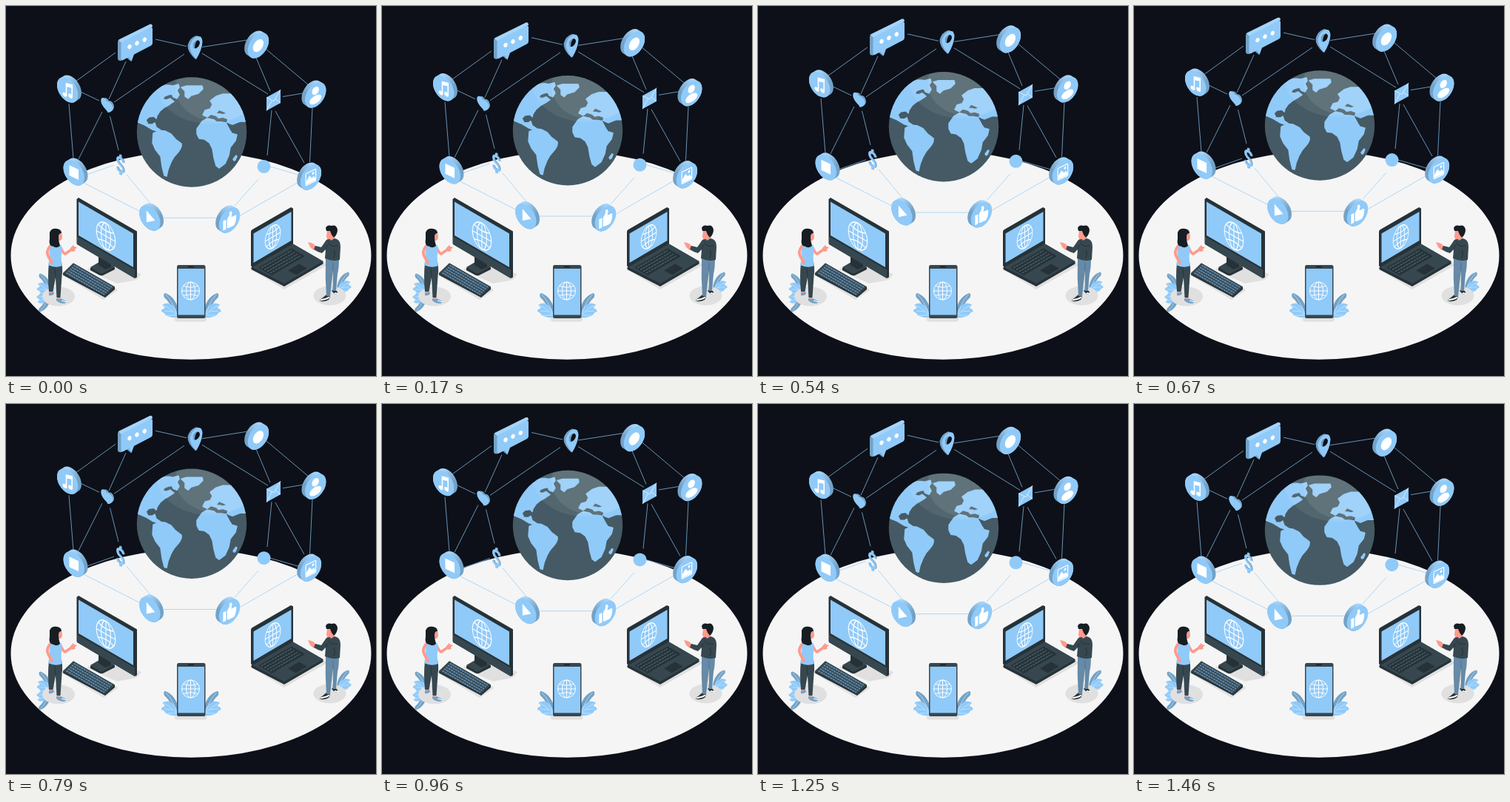
An HTML page for the animation above (1500 ms loop, 500 by 500 pixels).

```html
<!DOCTYPE html>
<html lang="en">
<head>
<meta charset="utf-8">
<title>Connected world</title>
<style>
  html, body { margin: 0; height: 100%; overflow: hidden; background: #0d1018; }
  svg { display: block; width: 100vw; height: 100vh; }
  .blue { fill: #90caf9; }
  .shade { fill: #73a2c7; }
  .white { fill: #fff; }
  .dark { fill: #263238; }
  .slate { fill: #37474f; }
  .grey { fill: #455a64; }
  .floor { fill: #e0e0e0; }
  .skin { fill: #ff9a8c; }
  .line { fill: none; stroke: #fff; stroke-width: 1.3; }
  .land { fill: #90caf9; stroke: #90caf9; stroke-width: 1.5; stroke-linejoin: round; }
</style>
</head>
<body>
<svg viewBox="0 0 500 500">
  <defs>
    <linearGradient id="rim" gradientUnits="userSpaceOnUse" x1="-12" y1="-16" x2="20" y2="8">
      <stop offset=".2" stop-color="#a6d4fa"/><stop offset=".65" stop-color="#73a2c7"/>
    </linearGradient>
    <clipPath id="ball"><circle cx="251" cy="170.5" r="74.2"/></clipPath>
    <!-- Disc in an isometric plane: a round-capped stroke makes the thickness -->
    <g id="disc">
      <path d="M0 0L5-5" stroke="url(#rim)" stroke-width="31.6" stroke-linecap="round"/>
      <circle r="15.8" class="blue"/>
    </g>
    <g id="web" class="line">
      <circle r="16"/><ellipse rx="8" ry="16"/>
      <path d="M0-16V16M-16 0H16M-13-9Q0-4 13-9M-13 9Q0 4 13 9"/>
    </g>
    <path id="dollar" d="M4.500-5Q4.500-9 0-9Q-4.500-9-4.500-5Q-4.500-1.500 0 0Q4.500 1.500 4.500 5Q4.500 9 0 9Q-4.500 9-4.500 5M0-13.500V-9M0 9V13.500" fill="none" stroke-width="3"/>
    <g id="plant">
      <path class="shade" d="M0-2C0-16 8-27 18-30Q21-29 19-24C14-20 9-12 4 0Z"/>
      <path class="blue" d="M0 0Q3-10 10-15Q16-18 22-14Q18-12 19-9Q23-9 23-5Q19-4 18-1Q12 4 0 3Z"/>
      <path d="M2 0Q7-18 17-28M2 1Q8-8 19-13M7-5L19-6M4 0L15 0" fill="none" stroke="#d3eafd" stroke-width=".7"/>
    </g>
  </defs>

  <ellipse cx="250" cy="337" rx="243.5" ry="140.7" fill="#f5f5f5"/>

  <!-- Desktop computer -->
  <g>
    <path class="floor" d="M109 356L130 345L183 362L177 370L150 375L132 367Z"/>
    <path class="dark" d="M114 354L131 344L147 353V356L131 364Q128 365 125 363L114 357Z"/>
    <path class="slate" d="M114 353L131 343L147 352L131 361Q128 362 125 360Z"/>
    <path class="dark" d="M125 335H142V353L134 356L125 350Z"/>
    <path class="dark" d="M95.500 261L98 259L177 304.500V366.500L174 368L96 322Q95.500 321 95.500 320Z"/>
    <path class="slate" d="M96 311.500L174 356.500V368L96 322Z"/>
    <path class="blue" d="M98 264.500L172 307.500V353L98 310Z"/>
    <use href="#web" transform="translate(135 311) matrix(.8 .46 0 1.1 0 0)"/>
    <path class="floor" d="M76 364L132 397L151 384L147 380Z"/>
    <path class="dark" d="M77 361L91 347.500L147 379.500V383L134 394L77 363.500Z"/>
    <path class="slate" d="M77 361L91 347.500L147 379.500L134 391.500Z"/>
    <g stroke="#5d8bb0" stroke-width="1.800" stroke-dasharray="3 .8">
      <path d="M91.500 350.500L143 380M89 353L140.500 382.500M86.500 355.500L138 385M84 358L135.500 387.500M81.500 360.500L133 390"/>
    </g>
  </g>

  <!-- Laptop -->
  <g>
    <path class="floor" d="M333 357L376 383L434 350L427 344Z"/>
    <path class="dark" d="M331.500 353L387 321L428.500 345V348.500L376 379L331.500 356Z"/>
    <path class="slate" d="M332 352.500L387 321L428.500 345L376 375Z"/>
    <path class="dark" d="M331 305Q331 303 333 302L385 272L388 273.500V321L333 353L331 351Z"/>
    <path class="blue" d="M334.500 307.500L385.500 278V317L334.500 347Z"/>
    <use href="#web" transform="translate(360.500 312) matrix(.65 -.38 0 .94 0 0)"/>
    <path class="dark" d="M341 353.500L386 327.500L404 338L359 364Z"/>
    <path d="M345 354L386 330.500M349 356.500L390 333M353 358.800L394 335.300M357 361L398 337.500" stroke="#455a64" stroke-width="1.600" stroke-dasharray="3.200 .9"/>
    <path class="dark" d="M381 357.500L396 348.500L407 354.500L392 363.500Z"/>
  </g>

  <!-- Phone -->
  <g>
    <use href="#plant" transform="translate(267.500 418)"/>
    <use href="#plant" transform="translate(233 418) scale(-1 1)"/>
    <rect class="floor" x="228" y="420.500" width="43" height="6" rx="3"/>
    <rect class="slate" x="231" y="350" width="38.500" height="72" rx="2.500"/>
    <rect class="blue" x="232.500" y="355" width="35.500" height="62.500"/>
    <path d="M246 352.500h8" stroke="#10181d" stroke-width="1.200"/>
    <use href="#web" transform="translate(249.500 385) scale(.75)"/>
  </g>

  <!-- Woman -->
  <g>
    <use href="#plant" transform="translate(61 388) scale(-.85)"/>
    <use href="#plant" transform="translate(62 388) scale(-.88 .88)"/>
    <ellipse class="floor" cx="71" cy="392.500" rx="22" ry="13"/>
    <path class="skin" d="M59 384h4v5h-4ZM69 392h4v5h-4Z"/>
    <path class="shade" d="M58 387q4 1 6-1l1 3q-3 3-7 2ZM68 395q4 2 6 0l7 4q1 3-3 3-6 0-10-4Z"/>
    <path d="M75 398l6 2" stroke="#fff" stroke-width="1.200"/>
    <path class="slate" d="M58 347L75 346Q77 355 75.500 365L73.500 394H68.500L67 367L63.500 386H58Q56 366 58 347Z"/>
    <path d="M67 367L66 354" stroke="#263238" stroke-width=".8"/>
    <path d="M73 325Q77 334 80 335L90 328" fill="none" stroke="#ff9a8c" stroke-width="3.800" stroke-linejoin="round"/>
    <path class="skin" d="M87 327l4-4 1 2 4 1-3 3 1 2-5 1Z"/>
    <path class="blue" d="M58 323Q66 318 74 323Q77 328 75 335Q74 342 76 351Q67 355 57 350Q60 338 58 323Z"/>
    <path d="M59 325Q54 332 57 338L62 347" fill="none" stroke="#ff9a8c" stroke-width="3.800" stroke-linecap="round"/>
    <path class="skin" d="M67 306Q74 303 75.500 308L76 313Q75 318 71 317V323H66Z"/>
    <path d="M59 306Q61 300 69 301Q75 302 75 307Q71 307 71 312Q71 318 73 324Q69 328 64 325Q57 325 59 314Z" fill="#161e24"/>
  </g>

  <!-- Man -->
  <g>
    <use href="#plant" transform="translate(447 385) scale(.85)"/>
    <ellipse class="floor" cx="437.500" cy="391.500" rx="22" ry="13"/>
    <path class="dark" d="M442 383l5 2 2 4q-3 2-6-1l-3-3ZM433 390l5 1-1 5q-5 4-12 3-2-2 2-4Z"/>
    <path d="M425 397.500l8-2 4-2M444 388l5 1" stroke="#fff" stroke-width="2" fill="none"/>
    <path d="M432 340H450Q450 355 448 362L446 385H441.500L442 358L438 392H433Q431 366 432 340Z" fill="#668aa7"/>
    <path d="M442 358V347" stroke="#4d6c86" stroke-width=".8"/>
    <path class="skin" d="M408 319l4 1 3 1 4 4-3 5-5-4Z"/>
    <path class="slate" d="M433 316Q440 312 447 315Q452 317 452 326L451 343Q441 346 431 341L432 329L427 334Q422 333 416 329L418 324L426 326Z"/>
    <path d="M435 320q5 6 13 4M443 329q3 6 0 12M432 329l2-6" fill="none" stroke="#263238"/>
    <path class="skin" d="M434 304h8l2 10-5 3-1-2q-5 1-5-4Z"/>
    <path d="M432 300Q434 295 440 297Q446 295 448 302Q448 309 443 313L440 309L438 304L433 304Z" fill="#161e24"/>
  </g>

  <!-- Floating network -->
  <g id="network">
    <path fill="none" stroke="#90caf9" stroke-width=".7" d="M202 45L244 54.500M265 55.500L326 46M351 58L408 106M148 63L94 102M162 75L139 126M241 65L146 130M265 64L354 119M338 70L357 115M401 118L374 122.500M102 116.500L126 128M85 132L91 206M130 143L98 207M140.500 149L152 195M109 228L146 215M106 239.500L182 278M163 228L197 269M213 286.300H284M309 270L341 234M315 284L397 237M357 217L395 228M359 141L353 202M364 142L403 212M414 138L410.500 211"/>

    <circle cx="251" cy="170.500" r="74.200" class="grey"/>
    <g clip-path="url(#ball)">
      <g class="land">
        <path d="M176 156Q184 125 206 112Q214 105 225 108L233 106L234 110L231 114L234 120L231 125L226 123L224 119L219 120L214 122L212 126L217 127L222 125L227 129L221 133L214 137L208 142L204 148L203 152L200 149L193 150L189 154L192 160L198 160L201 158L203 164L209 168L207 170L198 167L188 161Z"/>
        <path d="M199 172Q207 167 215 169L223 173L229 180L237 186Q238 191 233 197L227 204L223 211L219 221L217 230L214 229L211 217L209 203L202 194L198 185Z"/>
        <path d="M237 110L244 108L265 108L266 112L260 118L250 121L246 125L242 122L242 115Z"/>
        <path d="M266 147L269 141L276 139L279 133L276 128L284 122L293 119L304 119L335 130V156L316 156L306 160L298 157L284 152L272 150Z"/>
        <path d="M258 166L265 156L272 152L283 151L288 155L297 157L301 164L305 172L312 174L310 182L303 191L301 202L296 213L288 219L284 216L281 205L279 193L275 185L268 180L261 179L258 173Z"/>
        <path d="M307 207l4-5 1 1-2 5-2 1Z"/>
      </g>
      <path class="grey" d="M272 151l5-4 7 2 3 3 6-1 6 2-1 4-7-1-6 0-4-3-5-1ZM285 145l3-4 5 2 4 2-4 1-4-1ZM298 158l6 11 1-1-5-10Z"/>
      <ellipse cx="275" cy="105" rx="72" ry="54" fill="#fff" opacity=".07"/>
      <ellipse cx="285" cy="111" rx="56" ry="45" fill="#fff" opacity=".08"/>
    </g>

    <!-- Speech bubble -->
    <path class="shade" d="M151 49Q151 46 153 45L194 25Q197 23.500 198 27L160 72L155 74Q151 74 151 71Z"/>
    <path fill="#a6d4fa" d="M152 46L194 25Q197 23.500 198 28L156 50Z"/>
    <path class="shade" d="M163 70L169 75L167 66Z"/>
    <path class="blue" d="M155.500 52Q155.500 49.500 158 48L195 29.500Q198 28 198 31V50Q198 52 196 53.500L173 65.500L169.500 75L166 69L158 73Q155.500 74 155.500 71Z"/>
    <g class="white">
      <ellipse cx="167" cy="55" rx="2.500" ry="3.200" transform="rotate(28 167 55)"/>
      <ellipse cx="177" cy="50.300" rx="2.500" ry="3.200" transform="rotate(28 177 50.300)"/>
      <ellipse cx="187.300" cy="45.500" rx="2.500" ry="3.200" transform="rotate(28 187.300 45.500)"/>
    </g>

    <!-- Map pin -->
    <path class="shade" d="M256 72Q245 62 245.500 53Q248 43 257 40L264 42Z"/>
    <path class="blue" d="M257 72Q248 62 248.500 54Q251 44 258.500 41Q265 40 265.500 48Q265 59 257 72Z"/>
    <path d="M257 57Q262 54 262 49Q261 45 257 47Q252.500 50 253 55Q254 58 257 57Z" fill="#0d1018"/>
    <path class="shade" d="M253 55Q252.500 50 257 47L258.500 46.600Q255 50 255 57.500Q253.500 57.500 253 55Z"/>

    <!-- Heart -->
    <path class="shade" d="M133 124Q137 124 139 128Q145 128 146 136Q146 141 141 143L137 144Z"/>
    <path class="blue" d="M136 128.500Q134 123.500 130 124Q127 126 129 131.500Q131 137 139 144Q145 142 144.500 136Q142 130 136 128.500Z"/>

    <!-- Envelope -->
    <path class="blue" d="M352 123.500L371 113V131L352 141.500Z"/>
    <path d="M352 123.500L362 128.500L371 113M352 141.500L359.500 127.500M371 131L364 125.500" fill="none" stroke="#e8f4fe" stroke-width=".8"/>

    <!-- Dollar -->
    <g transform="translate(154.300 214.700) matrix(.866 .5 0 1 0 0)">
      <use href="#dollar" x="1.300" y="-1" stroke="#73a2c7"/><use href="#dollar" stroke="#90caf9"/>
    </g>

    <circle cx="348.500" cy="217" r="9" class="blue"/>

    <!-- Discs facing left -->
    <g transform="translate(83.200 113.500) matrix(.9 .43 0 1 0 0)">
      <use href="#disc"/>
      <g class="white">
        <ellipse cx="-4.200" cy="8" rx="3.300" ry="2.800"/><ellipse cx="4.300" cy="6.300" rx="3.300" ry="2.800"/>
        <path d="M-2.800 8V-8.500L7.600-10.500V6.500H5.800V-5.500L-1-3.800V8Z"/>
      </g>
    </g>
    <g transform="translate(91.800 225.500) matrix(.9 .43 0 1 0 0)">
      <use href="#disc"/>
      <rect class="white" x="-7" y="-7.500" width="14" height="14"/>
    </g>
    <g transform="translate(194.300 286.500) matrix(.9 .43 0 1 0 0)">
      <use href="#disc"/>
      <path class="white" d="M-5-8V8L8 0Z"/>
    </g>

    <!-- Discs facing right -->
    <g transform="translate(340.900 53.500) matrix(.9 -.43 0 1 0 0)">
      <use href="#disc" transform="scale(-1 1)"/>
      <circle class="white" r="8"/>
    </g>
    <g transform="translate(418.200 120.500) matrix(.9 -.43 0 1 0 0)">
      <use href="#disc" transform="scale(-1 1)"/>
      <circle class="white" cy="-6" r="5.200"/><ellipse class="white" cy="6" rx="9" ry="5.600"/>
    </g>
    <g transform="translate(411.900 231.500) matrix(.9 -.43 0 1 0 0)">
      <use href="#disc" transform="scale(-1 1)"/>
      <rect class="line" x="-7.500" y="-8" width="15" height="16" rx="1"/>
      <path class="white" d="M-7 7V3L-2-3L2 2L4 0L7 4V7Z"/><circle class="white" cx="3.500" cy="-4" r="1.700"/>
    </g>
    <g transform="translate(301.900 289.500) matrix(.9 -.43 0 1 0 0)">
      <use href="#disc" transform="scale(-1 1)"/>
      <path class="white" d="M-9.500-3H-5V10H-9.500ZM-3.500-2.500L0-7V-11Q4-12 4-8L3-3H9Q11.500-2 10 1Q11 3 9.300 5Q10 7 8 8Q8 10 6 10H-1L-3.500 9Z"/>
    </g>
  </g>
</svg>
<script>
  const LOOP = 1500, RISE = 10, LEAD = 25;
  const network = document.getElementById('network');

  // Linear rise and fall, starting slightly after the lowest point
  const height = t => RISE * (1 - Math.abs(1 - 2 * (((t + LEAD) % LOOP) / LOOP)));
  const rest = height(0);
  const start = performance.now();

  function draw(now) {
    const t = Math.max(0, now - start);
    network.setAttribute('transform', `translate(0 ${(rest - height(t)).toFixed(3)})`);
    requestAnimationFrame(draw);
  }
  draw(start);
</script>
</body>
</html>
```
